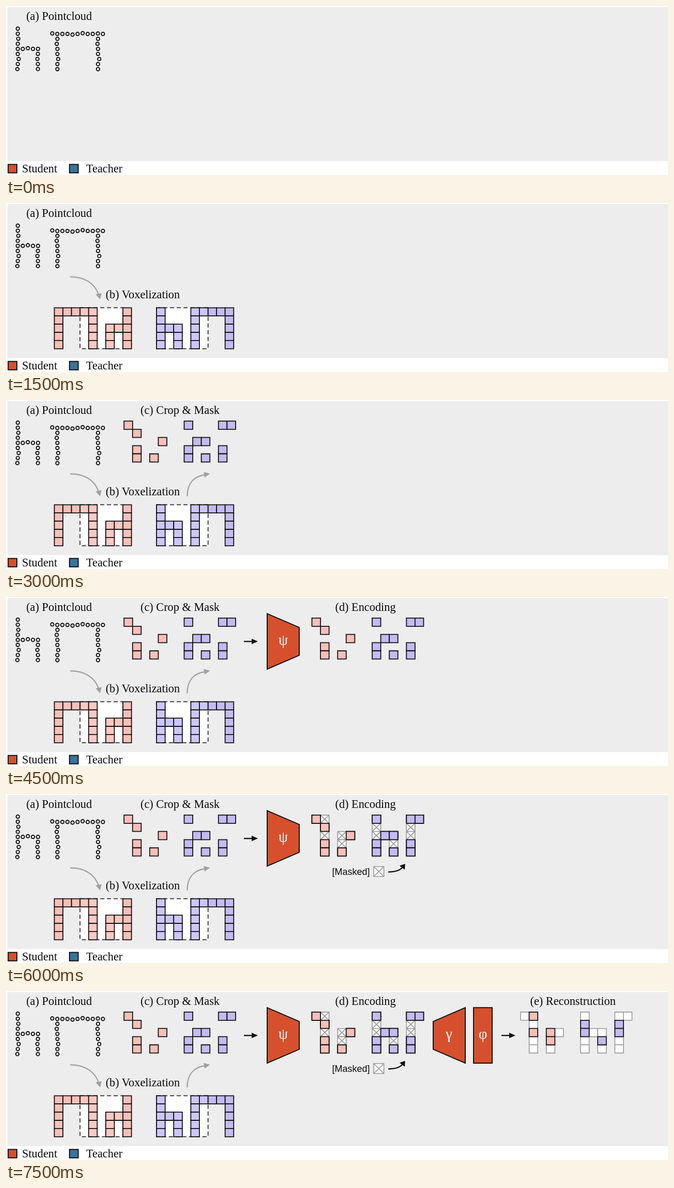
These frames come from a looping animation (1280x328 px, 8000 ms). An HTML page:

```html
<!DOCTYPE html>
<html lang="en">
<head>
<meta charset="utf-8">
<title>Masked point cloud pre-training</title>
<style>
html, body { margin: 0; width: 100%; height: 100%; overflow: hidden; background: #fff; }
svg { display: block; width: 1280px; height: 328px; }
text { font: 22.3px "Liberation Serif", Times, serif; fill: #0a0a0a; }
.greek { font-size: 29px; fill: #fff; text-anchor: middle; }
.sans { font: 18px "Liberation Sans", Arial, sans-serif; }
.net { fill: #d6502e; stroke: #111; stroke-width: 2; }
.dots { fill: #f4f4f4; stroke: #111; stroke-width: 1.9; }
.crop { fill: #fff; stroke: #444; stroke-width: 2; stroke-dasharray: 8 5; }
.line { fill: none; stroke-width: 2.3; }
.grey { stroke: #a0a0a0; fill: #a0a0a0; }
.black { stroke: #0a0a0a; fill: #0a0a0a; }
.head { stroke: none; }
.cell { stroke: #111; stroke-width: 1.8; }
.blank, .mask { fill: #fff; stroke: #999; stroke-width: 1.6; }
.mask { fill: #f8f8f8; }
.pink { fill: #f9bfb9; }
.pink.in { fill: #ffc8c2; }
.violet { fill: #c3bbf2; }
.violet.in { fill: #ccc6ff; }
.step { animation: 8s step-end infinite; }
#voxels { animation-name: show1; }
#crops { animation-name: show2; }
#encode { animation-name: show3; }
#masks { animation-name: show4; }
#rebuild { animation-name: show5; }
@keyframes show1 { 0% { opacity: 0 } 18.75%, 100% { opacity: 1 } }
@keyframes show2 { 0% { opacity: 0 } 37.5%, 100% { opacity: 1 } }
@keyframes show3 { 0% { opacity: 0 } 56.25%, 100% { opacity: 1 } }
@keyframes show4 { 0% { opacity: 0 } 75%, 100% { opacity: 1 } }
@keyframes show5 { 0% { opacity: 0 } 93.75%, 100% { opacity: 1 } }
</style>
</head>
<body>
<svg viewBox="0 0 1280 328">
  <rect x="3" y="2" width="1277" height="299" fill="#ededed"/>
  <rect class="net" x="4.2" y="307.5" width="16.8" height="16.3"/>
  <text x="31" y="323">Student</text>
  <rect x="122.8" y="307.5" width="16.8" height="16.3" fill="#38749e" stroke="#111" stroke-width="2"/>
  <text x="155" y="323">Teacher</text>

  <text x="39.2" y="27">(a) Pointcloud</text>
  <g id="dots" class="dots"></g>

  <g id="voxels" class="step">
    <g class="grey">
      <path class="line" d="M124 143.3C156 143.5 172 158 179.3 178"/>
      <path class="head" d="M173.3 177.2L184.8 175L182 187Z"/>
    </g>
    <text x="192.7" y="185">(b) Voxelization</text>
    <rect class="crop" x="143.1" y="203.3" width="83" height="79.5"/>
    <rect class="crop" x="291.1" y="203.3" width="99.6" height="79.5"/>
  </g>

  <g id="crops" class="step">
    <g class="grey">
      <path class="line" d="M350.3 187C350.5 163 362 148 385 145"/>
      <path class="head" d="M382.3 139.8L394.5 143L384 150.5Z"/>
    </g>
    <text x="260" y="27">(c) Crop &amp; Mask</text>
  </g>

  <g id="encode" class="step">
    <g class="black">
      <path class="line" d="M460 86.3H477"/>
      <path class="head" d="M475 81L487 86.3L475 91.6Z"/>
    </g>
    <path class="net" d="M505 32.3L567 59.2V113.2L505 140Z"/>
    <text class="greek" x="536" y="93">ψ</text>
    <text x="636.5" y="27">(d) Encoding</text>
  </g>

  <g id="masks" class="step">
    <text class="sans" x="630.5" y="156.5">[Masked]</text>
    <path class="mask" d="M711 140.7h19.6v19.6h-19.6zl19.6 19.6m0 -19.6l-19.6 19.6"/>
    <g class="black">
      <path class="line" d="M739 151.3C753 151.3 762 148 767 142"/>
      <path class="head" d="M761 139.3L771.7 135.5L771 147Z"/>
    </g>
  </g>

  <g id="rebuild" class="step">
    <path class="net" d="M826 59.2L888 32.3V140L826 113.2Z"/>
    <rect class="net" x="904" y="32.3" width="36" height="107.7"/>
    <text class="greek" x="856.5" y="93">γ</text>
    <text class="greek" x="922" y="93">φ</text>
    <g class="black">
      <path class="line" d="M958 86.3H975"/>
      <path class="head" d="M973 81L985 86.3L973 91.6Z"/>
    </g>
    <text x="1013.5" y="27">(e) Reconstruction</text>
  </g>
</svg>
<script>
const CW = 16.57, CH = 15.9, GAP = 9.8;

function add(id, tag, attrs) {
  const el = document.createElementNS('http://www.w3.org/2000/svg', tag);
  for (const k in attrs) el.setAttribute(k, attrs[k]);
  document.getElementById(id).append(el);
}

// A run of evenly spaced dots, each pushed sideways by its wobble.
function dots(x, y, across, wobble) {
  wobble.forEach((w, i) => add('dots', 'circle', {
    cx: x + (across ? i * GAP : w),
    cy: y + (across ? w : i * GAP),
    r: 3.2
  }));
}
dots(22.8, 44, false, [0, 0, 1, 0, 0, 0, 1.7, 0, -.8]);
dots(32.5, 83.2, true, [0, -1.3, 0, 0]);
dots(61.7, 93, false, [0, -1, 0, 0]);
dots(89.4, 54.2, true, [-1, 0, 0, 0, 1.3, 0, -1.5, 0, 0, -.8, 0]);
dots(99.4, 63.7, false, [0, -1.3, 0, 0, 1.5, 0, 0]);
dots(177.9, 63.7, false, [0, -1, 0, 0, 2.4, 0, 0]);

// Shapes are rows of text: # seen, x masked, + inside the crop.
function cells(id, x, y, rows, key, cls, cross) {
  rows.forEach((row, r) => [...row].forEach((c, i) => {
    if (c !== key) return;
    let d = `M${x + i * CW} ${y + r * CH}h${CW}v${CH}h${-CW}z`;
    if (cross) d += `l${CW} ${CH}m0 ${-CH}l${-CW} ${CH}`;
    add(id, 'path', { d, class: cls });
  }));
}

const scenes = [
  { hue: 'pink', x: 93.5, crop: 228.2, coded: 591.5, built: 995,
    full: ['###++   #', '#   +   #', '#   + ++#', '#   + + #', '#   + + #'],
    part: ['#x', ' #', ' x x#', ' # x', ' # #'] },
  { hue: 'violet', x: 291.1, crop: 344.5, coded: 708, built: 1111,
    full: ['+   ++###', '+   +   #', '+++ +   #', '+ + +   #', '+ + +   #'],
    part: ['#   ##', 'x   x', 'x## x', '# x #', '# # #'] }
];

for (const { hue, x, crop, coded, built, full, part } of scenes) {
  const solid = 'cell ' + hue, top = 40.9;
  cells('voxels', x, 203.3, full, '#', solid);
  cells('voxels', x, 203.3, full, '+', solid + ' in');
  cells('crops', crop, top, part, '#', solid);
  cells('masks', coded, top, part, 'x', 'mask', true);
  cells('masks', coded, top, part, '#', solid);
  cells('encode', coded, top, part, '#', solid);
  cells('rebuild', built, top, part, '#', 'blank');
  cells('rebuild', built, top, part, 'x', solid);
}
</script>
</body>
</html>
```
